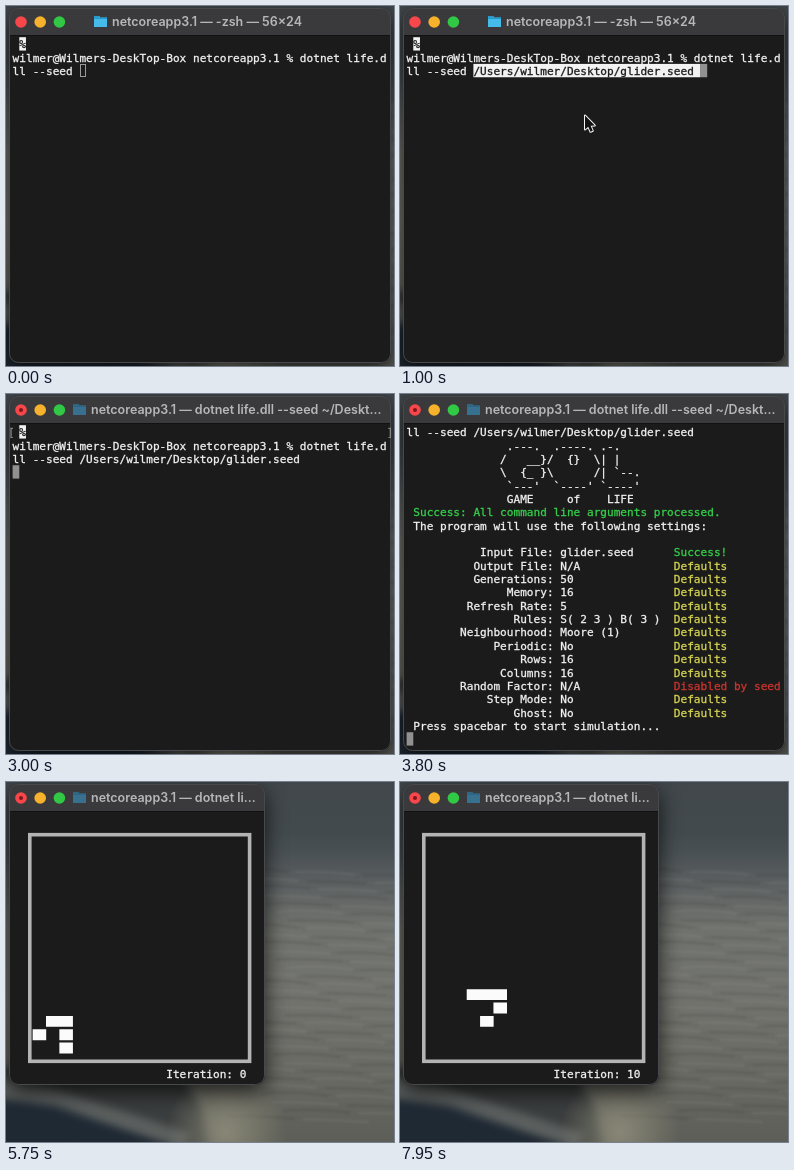
Animation, 388 px wide and 360 px high, one loop 8 s. Source, as an HTML page with a canvas:

```html
<!DOCTYPE html>
<html lang="en">
<head>
<meta charset="utf-8">
<title>Game of Life in a terminal</title>
<style>
  html, body { margin: 0; width: 100%; height: 100%; overflow: hidden; background: #1b1e24; }
  canvas { display: block; width: 388px; height: 360px; }
</style>
</head>
<body>
<canvas id="stage"></canvas>
<script>
const W = 388, H = 360, LOOP = 8000;
const canvas = document.getElementById('stage');
const ctx = canvas.getContext('2d');
const scale = window.devicePixelRatio || 1;
canvas.width = W * scale;
canvas.height = H * scale;

// Times in ms
const DRAG_START = 100, DROP = 750, ENTER = 1400, OUTPUT = 3150;
const GAME = 5700, FIRST_STEP = 6140, STEP = 200;

// Terminal grid
const COL = 6.68, ROW = 13.35, LEFT = 6.6, TOP = 31.2;
const colX = c => LEFT + c * COL;
const rowY = r => TOP + r * ROW;

const WHITE = '#f2f2f2', GREEN = '#35d04b', YELLOW = '#d6d552', RED = '#cb342e';
const BODY = '#1b1b1b', CURSOR = '#919191';

const PROMPT = 'wilmer@Wilmers-DeskTop-Box netcoreapp3.1 % dotnet life.d';
const COMMAND = 'll --seed ';
const PATH = '/Users/wilmer/Desktop/glider.seed ';
const BANNER = [
  ' .---.  .----. .-.',
  '/   __}/  {}  \\| |',
  '\\  {_ }\\      /| `--.',
  " `---'  `----' `----'",
  ' GAME     of    LIFE'
];
const SETTINGS = [
  ['Input File', 'glider.seed', 'Success!', GREEN],
  ['Output File', 'N/A'],
  ['Generations', '50'],
  ['Memory', '16'],
  ['Refresh Rate', '5'],
  ['Rules', 'S( 2 3 ) B( 3 )'],
  ['Neighbourhood', 'Moore (1)'],
  ['Periodic', 'No'],
  ['Rows', '16'],
  ['Columns', '16'],
  ['Random Factor', 'N/A', 'Disabled by seed', RED],
  ['Step Mode', 'No'],
  ['Ghost', 'No']
];

function rect(x, y, w, h, color) {
  ctx.fillStyle = color;
  ctx.fillRect(x, y, w, h);
}

function shape(points, color) {
  ctx.beginPath();
  points.forEach(([x, y]) => ctx.lineTo(x, y));
  ctx.closePath();
  ctx.fillStyle = color;
  ctx.fill();
}

function disc(x, y, r, color) {
  ctx.beginPath();
  ctx.arc(x, y, r, 0, Math.PI * 2);
  ctx.fillStyle = color;
  ctx.fill();
}

// The thin outline gives the letters a medium weight
function put(col, row, text, color = WHITE) {
  ctx.font = '11.1px "DejaVu Sans Mono", monospace';
  ctx.fillStyle = ctx.strokeStyle = color;
  ctx.lineWidth = 0.3;
  [...text].forEach((ch, i) => {
    if (ch === ' ') return;
    ctx.fillText(ch, colX(col + i), rowY(row) + 11);
    ctx.strokeText(ch, colX(col + i), rowY(row) + 11);
  });
}

function block(col, row, count, color) {
  rect(colX(col), rowY(row), count * COL, ROW, color);
}

function withStops(g, ...stops) {
  stops.forEach(([at, color]) => g.addColorStop(at, color));
  return g;
}

// Muted seascape behind the window
function drawDesktop() {
  rect(0, 0, W, H, withStops(ctx.createLinearGradient(0, 0, 0, H),
    [0, '#41474b'], [0.14, '#434a4e'], [0.2, '#4a5154'], [0.28, '#5c6061'],
    [0.4, '#70726d'], [0.6, '#72736d'], [0.8, '#696a63'], [1, '#5d5e57']));

  ctx.filter = 'blur(1px)';
  ctx.lineWidth = 2.5;
  for (let i = 0; i < 90; i++) {
    const x = 215 + (i * 67) % 190, y = 88 + i * 2.8;
    ctx.strokeStyle = i % 2 ? 'rgba(165,165,152,.13)' : 'rgba(40,44,44,.13)';
    ctx.beginPath();
    ctx.moveTo(x, y);
    ctx.quadraticCurveTo(x + 35, y - 4 + i % 5, x + 75, y + 3);
    ctx.stroke();
  }

  ctx.filter = 'blur(4px)';
  shape([[-10, 285], [170, 285], [195, 325], [205, 370], [-10, 370]], '#3b3e3e');
  shape([[-10, 295], [40, 304], [185, 352], [175, 366], [-10, 325]], '#5c605f');
  shape([[-10, 316], [50, 324], [170, 366], [-10, 370]], '#1f2934');
  ctx.filter = 'none';
  rect(150, 290, 140, 70, withStops(ctx.createRadialGradient(220, 350, 0, 220, 350, 60),
    [0, 'rgba(150,148,128,.75)'], [1, 'rgba(150,148,128,0)']));
}

function drawWindow(w, h, title, titleX, running) {
  const x = 3, y = 2;
  const outline = () => {
    ctx.beginPath();
    ctx.roundRect(x, y, w, h, 9);
  };
  ctx.save();
  ctx.shadowColor = 'rgba(0,0,0,.75)';
  ctx.shadowBlur = 22 * scale;
  ctx.shadowOffsetY = 7 * scale;
  outline();
  ctx.fillStyle = BODY;
  ctx.fill();
  ctx.restore();

  ctx.save();
  outline();
  ctx.clip();
  rect(x, y, w, 27, '#3a3a3c');
  rect(x, 29, w, 1, '#111');
  ctx.restore();
  ctx.beginPath();
  ctx.roundRect(x + .5, y + .5, w - 1, h - 1, 9);
  ctx.strokeStyle = '#48494c';
  ctx.lineWidth = 1;
  ctx.stroke();

  ['#f8474b', '#f6b12d', '#31c846'].forEach((c, i) => disc(15 + 19.2 * i, 16, 5.8, c));
  if (running) disc(15, 16, 2, '#7c1519');

  const fx = titleX - 18;
  rect(fx, 10, 6, 4, running ? '#2f6582' : '#2797c9');
  rect(fx, 11.5, 13, 9.5, running ? '#37718f' : '#45bbe9');
  rect(fx, 11.5, 13, 1.5, running ? '#2f6582' : '#2797c9');

  ctx.font = '600 12.5px Inter, sans-serif';
  ctx.fillStyle = '#b7b7b9';
  ctx.fillText(title, titleX, 20.2);
}

function drawShell(t) {
  const dropped = t >= DROP, entered = t >= ENTER;
  block(1, 0, 1, WHITE);
  put(1, 0, '%', BODY);
  put(0, 1, PROMPT);
  put(0, 2, COMMAND);
  if (entered) {
    put(-0.7, 0, '[', '#8a8a8a');
    put(56, 0, ']', '#8a8a8a');
    put(10, 2, PATH);
    block(0, 3, 1, CURSOR);
  } else if (dropped) {
    block(10, 2, PATH.length, WHITE);
    put(10, 2, PATH, BODY);
    block(44, 2, 1, CURSOR);
  } else {
    ctx.strokeStyle = '#9a9a9a';
    ctx.lineWidth = 1;
    ctx.strokeRect(74.5, 58.5, 5, 12);
  }
}

function drawPointer(t) {
  if (t < DRAG_START || t >= ENTER) return;
  const p = Math.min(1, (t - DRAG_START) / (DROP - DRAG_START));
  const rest = (1 - p) ** 2;
  ctx.save();
  ctx.translate(185 + 205 * rest, 109.5 + 45 * rest);
  ctx.lineWidth = 2;
  ctx.lineJoin = 'round';
  ctx.strokeStyle = '#f4f4f4';
  shape([[0, 0], [0, 14], [3.2, 11.2], [5.5, 16.3], [7.8, 15.3], [5.6, 10.3], [9.8, 10]], '#111');
  ctx.stroke();
  ctx.fill();
  ctx.restore();
}

function drawSettings() {
  put(0, 0, COMMAND + PATH);
  BANNER.forEach((line, i) => put(14, 1 + i, line));
  put(1, 6, 'Success: All command line arguments processed.', GREEN);
  put(1, 7, 'The program will use the following settings:');
  SETTINGS.forEach(([label, value, status = 'Defaults', color = YELLOW], i) => {
    put(21 - label.length, 9 + i, label + ': ' + value);
    put(40, 9 + i, status, color);
  });
  put(1, 22, 'Press spacebar to start simulation...');
  block(0, 23, 1, CURSOR);
}

// Cells are [column, row], rows counted upwards from the bottom
function nextGeneration(cells) {
  const alive = (x, y) => cells.some(([a, b]) => a === x && b === y);
  const next = [];
  for (let y = 0; y < 16; y++) {
    for (let x = 0; x < 16; x++) {
      const n = cells.filter(([a, b]) =>
        Math.max(Math.abs(a - x), Math.abs(b - y)) === 1).length;
      if (n === 3 || (n === 2 && alive(x, y))) next.push([x, y]);
    }
  }
  return next;
}

const generations = [[[1, 2], [2, 2], [0, 1], [2, 1], [2, 0]]];
while (generations.length < 12) generations.push(nextGeneration(generations.at(-1)));

function drawGame(t) {
  const n = t < FIRST_STEP ? 0 : 1 + Math.floor((t - FIRST_STEP) / STEP);
  ctx.lineWidth = 3.6;
  ctx.strokeStyle = '#b4b4b4';
  ctx.strokeRect(23.8, 52.7, 219.8, 226.6);
  ctx.beginPath();
  for (const [x, y] of generations[n]) {
    ctx.rect(colX(3 + 2 * x), 260.6 - y * ROW, 2 * COL + 0.2, 10.9);
  }
  ctx.fillStyle = '#fbfbfb';
  ctx.fill();
  const label = 'Iteration: ' + n;
  put(35 - label.length, 19, label);
}

function draw(t) {
  ctx.setTransform(scale, 0, 0, scale, 0, 0);
  ctx.drawImage(desktop, 0, 0, W, H);
  if (t >= GAME) {
    drawWindow(256, 301, 'netcoreapp3.1 — dotnet li...', 85, true);
    drawGame(t);
    return;
  }
  if (t >= ENTER) {
    drawWindow(382, 355, 'netcoreapp3.1 — dotnet life.dll --seed ~/Deskt...', 85, true);
  } else {
    drawWindow(382, 355, 'netcoreapp3.1 — -zsh — 56×24', 106, false);
  }
  if (t >= OUTPUT) drawSettings();
  else drawShell(t);
  drawPointer(t);
}

// The still backdrop is painted once and kept
ctx.setTransform(scale, 0, 0, scale, 0, 0);
drawDesktop();
const desktop = document.createElement('canvas');
desktop.width = canvas.width;
desktop.height = canvas.height;
desktop.getContext('2d').drawImage(canvas, 0, 0);

const start = performance.now();
function frame() {
  draw((performance.now() - start) % LOOP);
  requestAnimationFrame(frame);
}
frame();
</script>
</body>
</html>
```
